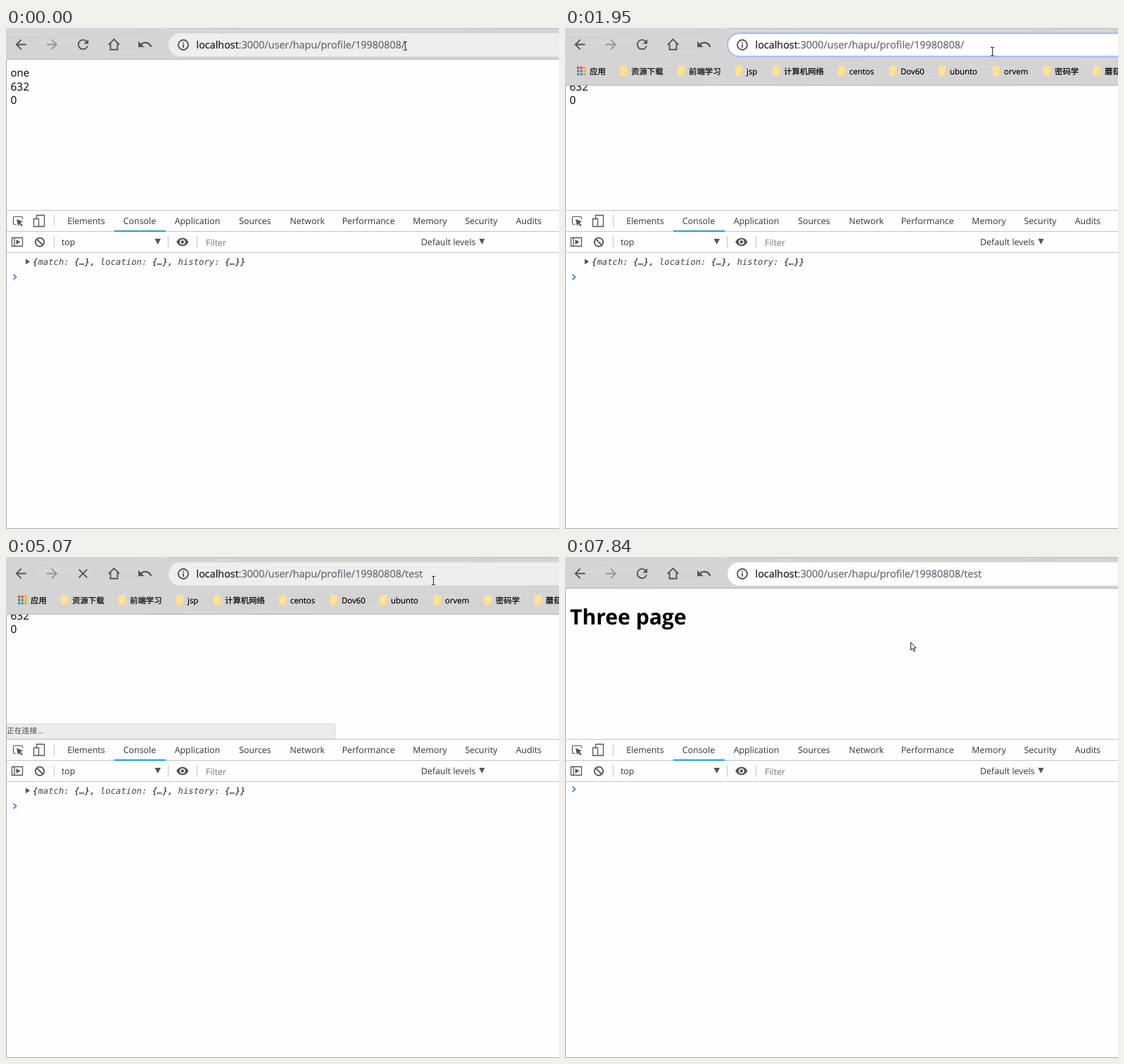
Write an HTML page that moves like this. It is 786 px wide and 713 px high and loops after 7990 ms.

```html
<!DOCTYPE html>
<html lang="zh">
<head>
<meta charset="utf-8">
<title>Route demo</title>
<style>
html, body { margin: 0; width: 100%; height: 100%; overflow: hidden; background: #fefefe; }
svg { display: block; }
text { font-family: "Open Sans", "Noto Sans", "Noto Sans CJK SC", "Noto Sans CJK", sans-serif; text-rendering: geometricPrecision; white-space: pre; }
.ui { font-size: 12.4px; fill: #333; }
.tab { text-anchor: middle; }
.url { font-size: 14.4px; fill: #666a6f; stroke: #666a6f; stroke-width: .25; }
.host { fill: #1c1c1c; stroke: #1c1c1c; }
.mark { font-size: 11.4px; font-weight: 500; fill: #000; stroke: #000; stroke-width: .2; }
.log { font: italic 12.25px "DejaVu Sans Mono", monospace; fill: #111; }
.key { fill: #444; }
.line { fill: none; stroke: #c4c4c4; }
.icon { fill: #555; }
.stroke { fill: none; stroke: #555; stroke-width: 1.9; }
</style>
</head>
<body>
<svg id="stage" width="786" height="713" viewBox="0 0 786 713"></svg>
<script>
const LOOP = 7990;

// Each step overrides parts of the state from its time on.
const steps = [
  [0, { bar: 44, pill: 'hover', icon: 'info', tail: '', caret: 0, busy: 0, logged: 1, page: 'counts', status: 0, beam: [567.5, 25.5], arrow: null }],
  [150, { bar: 55, beam: [577.5, 24.5] }],
  [280, { bar: 70, beam: [588.5, 24.5] }],
  [420, { bar: 81, pill: 'focus', caret: 567.5 }],
  [840, { beam: [598.5, 29.5] }],
  [970, { beam: [606.5, 32.5], caret: 0 }],
  [1120, { beam: [607.5, 33.5] }],
  [1400, { caret: 567.5 }],
  [1950, { caret: 0 }],
  [2380, { icon: 'globe', tail: 't', caret: 573.5 }],
  [2970, { tail: '', caret: 0 }],
  [3090, { caret: 567.5 }],
  [3620, { tail: 'te', caret: 581.5 }],
  [3740, { tail: 'tes', caret: 587.5 }],
  [3890, { tail: 'test', caret: 593.5 }],
  [4330, { caret: 0 }],
  [4790, { pill: 'hover', icon: 'info', busy: 1 }],
  [5070, { status: 1 }],
  [5200, { logged: 0 }],
  [5630, { page: '' }],
  [5900, { page: 'title', busy: 0 }],
  [6170, { status: 0.38 }],
  [6300, { status: 0 }],
  [6600, { beam: [593.5, 15.5] }],
  [6880, { bar: 77, pill: 'plain', beam: null, arrow: [543, 75] }],
  [7010, { bar: 64, arrow: [513, 110] }],
  [7150, { bar: 52, arrow: [516, 126] }],
  [7270, { bar: 44, arrow: [518, 136] }],
  [7540, { arrow: [516, 135] }],
  [7690, { arrow: [509, 126] }],
  [7840, { arrow: [491, 121] }]
];

const pills = {
  hover: ['#eeeeee', 'none'],
  focus: ['#ffffff', '#9dbbee'],
  plain: ['#fdfdfd', 'none']
};

const text = (x, y, s, cls, more = '') => `<text x="${x}" y="${y}" class="${cls}" ${more}>${s}</text>`;
const rect = (x, y, w, h, fill, more = '') => `<rect x="${x}" y="${y}" width="${w}" height="${h}" fill="${fill}" ${more}/>`;
const path = (d, cls = 'icon', more = '') => `<path d="${d}" class="${cls}" ${more}/>`;
// 24-unit icon centred on a point
const glyph = (x, y, d, size = 1, more = '') =>
  path(d, 'icon', `transform="translate(${x} ${y}) scale(${size}) translate(-12 -12)" ${more}`);

function streaks() {
  let seed = 7, out = '';
  const rnd = () => (seed = seed * 16807 % 2147483647) / 2147483647;
  for (let i = 0; i < 70; i++) {
    const tone = rnd() < 0.6 ? '#fff' : '#bbb';
    out += rect((rnd() * 786 - 30).toFixed(1), Math.floor(rnd() * 80), (15 + rnd() * 70).toFixed(1), 1, tone, 'opacity=".15"');
  }
  return out;
}

function bookmarks() {
  const dots = ['#e8473a', '#e8473a', '#f0b400', '#34a853', '#4285f4', '#f0b400', '#34a853', '#4285f4', '#e8a33a'];
  const names = [
    [94, '资源下载'], [176, '前端学习'], [258, 'jsp'], [311, '计算机网络'], [404, 'centos'], [477, 'Dov60'],
    [547, 'ubunto'], [624, 'orvem'], [696, '密码学'], [767, '蘑菇']
  ];
  const grid = dots.map((c, i) => rect(17 + i % 3 * 4.6, 55 + Math.floor(i / 3) * 4.6, 3.3, 3.3, c)).join('');
  const folder = x => rect(x + 1, 54, 10, 14, '#fde293', 'rx=".8"') + rect(x + 9, 62, 3, 6, '#f9d878', 'rx=".6"');
  return grid + text(35, 65.5, '应用', 'mark') +
    names.map(([x, s]) => folder(x - 17) + text(x, 65.5, s, 'mark')).join('');
}

const arrowBack = 'M20 11H7.83l5.59-5.59L12 4l-8 8 8 8 1.41-1.41L7.83 13H20z';
const reload = 'M17.65 6.35A7.96 7.96 0 0 0 12 4a8 8 0 1 0 7.73 10h-2.08A5.99 5.99 0 0 1 12 18a6 6 0 1 1 0-12c1.66 0 3.14.69 4.22 1.78L13 11h7V4z';
const undo = 'M12.5 8c-2.65 0-5.05.99-6.9 2.6L2 7v9h9l-3.62-3.62c1.39-1.16 3.16-1.88 5.12-1.88 3.54 0 6.55 2.31 7.6 5.5l2.37-.78C21.08 11.03 17.15 8 12.5 8z';
const globe = 'M12 2a10 10 0 1 0 0 20 10 10 0 0 0 0-20zm-1 17.93c-3.95-.49-7-3.85-7-7.93 0-.62.08-1.21.21-1.79L9 15v1c0 1.1.9 2 2 2zm6.9-2.54c-.26-.81-1-1.39-1.9-1.39h-1v-3c0-.55-.45-1-1-1H8v-2h2c.55 0 1-.45 1-1V7h2c1.1 0 2-.9 2-2v-.41c2.93 1.19 5 4.06 5 7.41 0 2.08-.8 3.97-2.1 5.39z';
const eye = 'M12 4.5C7 4.5 2.73 7.61 1 12c1.73 4.39 6 7.5 11 7.5s9.27-3.11 11-7.5c-1.73-4.39-6-7.5-11-7.5zM12 17a5 5 0 1 1 0-10 5 5 0 0 1 0 10zm0-8a3 3 0 1 0 0 6 3 3 0 0 0 0-6z';

function toolbar() {
  return rect(0, 0, 786, 44, '#d4d4d4') +
    '<svg width="786" height="44"><use href="#streaks"/></svg>' +
    rect(231, 0, 555, 1, '#bdbdbd') +
    glyph(21, 23.5, arrowBack, 0.95) +
    glyph(65.5, 23.5, arrowBack, -0.95, 'opacity=".5"') +
    glyph(109.5, 23.5, reload, 0.95, 'id="reload"') +
    path('M103.7 17.7l11.6 11.6M115.3 17.7L103.7 29.3', 'stroke', 'id="stop"') +
    path('M145.8 23.8L153.5 16l7.7 7.8M148.5 22v8.8h10V22', 'stroke') +
    glyph(197.5, 23.5, undo, 0.95) +
    rect(231, 7.5, 600, 33, '#eee', 'rx="16.5" id="pill" stroke-width="2"') +
    `<g id="info"><circle cx="252" cy="24" r="7" class="stroke"/>${rect(251.1, 23, 1.8, 5, '#555')}${rect(251.1, 20, 1.8, 1.8, '#555')}</g>` +
    glyph(252, 24, globe, 0.77, 'id="globe"') +
    text(270.5, 28.6, '<tspan class="host">localhost</tspan>:3000/user/hapu/profile/19980808/<tspan id="tail"></tspan>', 'url') +
    rect(0, 14, 1, 18, '#777', 'id="caret"');
}

function devtools() {
  const tabs = [[114, 'Elements'], [190, 'Console'], [272, 'Application'], [354, 'Sources'], [428.3, 'Network'],
    [515.2, 'Performance'], [602.5, 'Memory'], [675.5, 'Security'], [743, 'Audits']];
  const key = s => `<tspan class="key">${s}</tspan>`;
  const entry = `{${key('match:')} {…}, ${key('location:')} {…}, ${key('history:')} {…}}`;
  return rect(0, 259, 786, 454, '#fefefe') +
    path('M0 259.5H786M0 289.5H786M0 319.5H786M68.5 266V283M68.5 296V313M230.5 296V313M271.5 296V313', 'line') +
    rect(154, 288, 73, 2, '#1a9fe0') +
    tabs.map(([x, s]) => text(x, 279, s, 'ui tab')).join('') +
    path('M14.5 279.5H12a1.5 1.5 0 0 1-1.5-1.5v-8a1.5 1.5 0 0 1 1.5-1.5h10a1.5 1.5 0 0 1 1.5 1.5v2', 'stroke', 'style="stroke-width:1.2"') +
    path('M15 272l9 3.6-3.6 1.6 3.4 3.6-1.6 1.5-3.4-3.5-1.7 3.3z') +
    path('M43.5 271V266.5h11v16h-8M39.5 271.5h7v11h-7z', 'stroke', 'style="stroke-width:1.3"') +
    path('M8.5 298.5h15v12h-15zM12 298.5v12', 'stroke', 'style="stroke-width:1.3"') +
    path('M14.5 301l6 3.5-6 3.5z') +
    '<circle cx="48" cy="304.8" r="6.2" class="stroke"/>' +
    path('M43.6 300.4l8.8 8.8', 'stroke') +
    text(79, 309.3, 'top', 'ui') + path('M211.5 300h8.5l-4.25 8z') +
    glyph(250.8, 304.5, eye, 0.77) +
    text(284, 309.8, 'Filter', 'ui', 'style="fill:#777"') +
    text(590, 309.3, 'Default levels', 'ui') + path('M672.5 300h8l-4 8z') +
    `<g id="entry">${path('M28 328.5l6 4-6 4z', 'icon')}${text(38, 336.5, entry, 'log')}</g>` +
    path('M10.5 -3.7l4 3.7-4 3.7', 'stroke', 'id="prompt" style="stroke:#367cf1;stroke-width:1.7"');
}

const stage = document.getElementById('stage');
stage.innerHTML =
  `<defs><g id="streaks">${streaks()}</g></defs>` +
  rect(0, 0, 786, 713, '#fefefe') +
  `<g id="counts">${text(6.5, 68.6, 'one', 'n', 'font-size="15"')}${text(6.5, 88.6, '632', 'n', 'font-size="15.5"')}${text(6.5, 108.2, '0', 'n', 'font-size="15.5"')}</g>` +
  text(7, 96.3, 'Three page', 'n', 'id="title" font-size="30.1" font-weight="700"') +
  `<g id="status">${path('M0 237.5H464a4 4 0 0 1 4 4V259H0z', 's', 'fill="#ececec" stroke="#d8d8d8"')}${text(1, 251.3, '正在连接...', 'n', 'font-size="10.8" fill="#444"')}</g>` +
  devtools() +
  rect(0, 44, 1, 669, '#aaa') + rect(0, 712, 786, 1, '#aaa') +
  `<svg id="bar" width="786" height="45">${rect(0, 0, 786, 90, '#d4d4d4')}<use href="#streaks"/><g id="marks">${bookmarks()}</g>${toolbar()}</svg>` +
  rect(0, 44, 786, 1, '#b2b2b2', 'id="edge"') +
  path('M-2.5 -6h2q.5 0 .5.5t.5-.5h2M0 -5.5v11M-2.5 6h2q.5 0 .5-.5t.5.5h2', 'stroke', 'id="beam" style="stroke:#222;stroke-width:1"') +
  path('M.5 .5V11.5L3 9.2l2 4.3 1.7-.8L4.8 8.5H8z', 'a', 'id="arrow" fill="#fff" stroke="#222"');

const el = id => document.getElementById(id);
const set = (id, name, value) => el(id).setAttribute(name, value);
const show = (id, on) => set(id, 'visibility', on ? 'visible' : 'hidden');
const place = (id, at) => {
  show(id, at);
  if (at) set(id, 'transform', `translate(${at})`);
};

function draw(t) {
  const s = Object.assign({}, ...steps.filter(([at]) => at <= t).map(([, change]) => change));
  set('bar', 'height', s.bar + 1);
  set('edge', 'y', s.bar);
  set('marks', 'transform', `translate(0 ${s.bar - 81})`);
  const [fill, outline] = pills[s.pill];
  set('pill', 'fill', fill);
  set('pill', 'stroke', outline);
  show('info', s.icon === 'info');
  show('globe', s.icon === 'globe');
  el('tail').textContent = s.tail;
  show('caret', s.caret);
  set('caret', 'x', Math.floor(s.caret));
  show('reload', !s.busy);
  show('stop', s.busy);
  show('entry', s.logged);
  set('prompt', 'transform', `translate(0 ${s.logged ? 354.5 : 330.5})`);
  show('counts', s.page === 'counts');
  show('title', s.page === 'title');
  set('status', 'opacity', s.status);
  place('beam', s.beam);
  place('arrow', s.arrow);
}

const start = performance.now();
function tick() {
  draw((performance.now() - start) % LOOP);
  requestAnimationFrame(tick);
}
tick();
</script>
</body>
</html>
```
